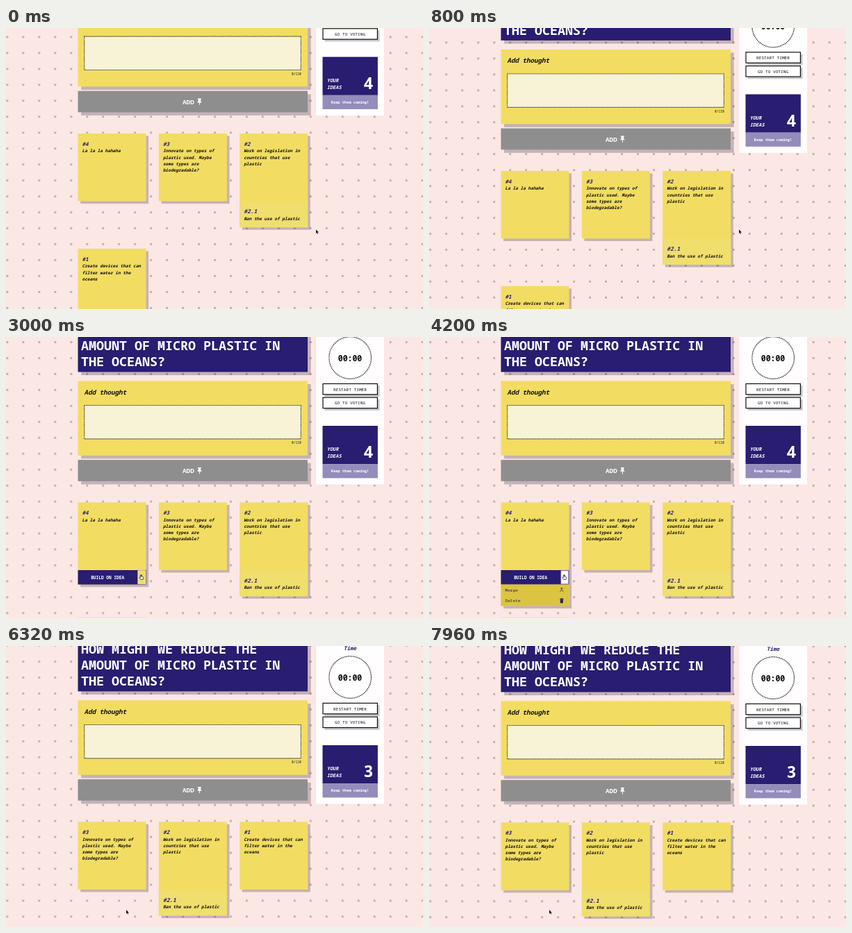
An HTML page for the animation above (8 s loop, 600 px wide and 405 px high).

```html
<!DOCTYPE html>
<html lang="en">
<head>
<meta charset="utf-8">
<title>Idea board</title>
<style>
  html, body { margin: 0; width: 100%; height: 100%; overflow: hidden; }
  svg {
    display: block; width: 600px; height: 405px;
    background: #fbe7e4 radial-gradient(circle, #b9a9ac 1.1px, #b9a9ac00 1.9px) 0 0 / 22.98px 22.98px;
  }
  text { font-family: "Noto Sans Mono", "DejaVu Sans Mono", monospace; font-weight: 500; white-space: pre; }
  .slant { font-style: italic; font-weight: 700; }
  .bold { font-weight: 700; }
</style>
</head>
<body>
<svg id="stage" viewBox="0 0 600 405"></svg>
<script>
const LOOP = 8000, OPEN_AT = 3800, DELETE_AT = 5640;
const NAVY = '#281d70', YELLOW = '#f2dd62', GOLD = '#dac442', INK = '#111', WHITE = '#fff';
const DOT_PITCH = 22.98;
const stage = document.getElementById('stage');

const CARD = { w: 98, h: 97.6, top: 238.4, xs: [103.5, 219.9, 336.2], rowGap: 166 };
const BAR_H = 20.7, ROW_H = 15.5;
const IDEAS = [
  { id: '#4', lines: ['La la la hahaha'] },
  { id: '#3', lines: ['Innovate on types of', 'plastic used. Maybe', 'some types are', 'biodegradable?'] },
  { id: '#2', lines: ['Work on legislation in', 'countries that use', 'plastic'],
    child: { id: '#2.1', line: 'Ban the use of plastic' } },
  { id: '#1', lines: ['Create devices that can', 'filter water in the', 'oceans'] },
];

// Tip of the pointer: time, x, y.
const CURSOR = [[1400, 446, 290.5], [2000, 194, 343], [4250, 194, 343], [4950, 172, 380.3], [5700, 172, 380.3], [5900, 173, 380.3]];

const clamp = v => Math.max(0, Math.min(1, v));
const smooth = v => (v = clamp(v), v * v * (3 - 2 * v));

// Vertical page shift relative to its resting place after the scroll.
function pageShift(t) {
  if (t >= DELETE_AT) return 15 + clamp((t - 7360) / 500);
  return 86.5 / (1 + Math.exp((742 - t) / 116)) - 86.5;
}

function cursorAt(t) {
  let i = 0;
  while (i < CURSOR.length - 2 && t > CURSOR[i + 1][0]) i++;
  const [t0, x0, y0] = CURSOR[i], [t1, x1, y1] = CURSOR[i + 1];
  const k = smooth((t - t0) / (t1 - t0));
  return { x: x0 + (x1 - x0) * k, y: y0 + (y1 - y0) * k };
}

const rect = (x, y, w, h, fill, extra = '') =>
  `<rect x="${x}" y="${y}" width="${w}" height="${h}" fill="${fill}" ${extra}/>`;
const shadow = (x, y, w, h, d) => rect(x + d, y + d, w, h, '#2d1c38', 'opacity=".26"');
const panel = (x, y, w, h, fill, d = 4.6) => shadow(x, y, w, h, d) + rect(x, y, w, h, fill);
const text = (x, y, size, fill, str, cls = '', anchor = 'start') =>
  `<text x="${x}" y="${y}" font-size="${size}" fill="${fill}" class="${cls}" text-anchor="${anchor}">${str}</text>`;
const path = (d, fill, extra = '') => `<path d="${d}" fill="${fill}" ${extra}/>`;
const at = (x, y, content) => `<g transform="translate(${x} ${y})">${content}</g>`;

function header() {
  const title = ['HOW MIGHT WE REDUCE THE', 'AMOUNT OF MICRO PLASTIC IN', 'THE OCEANS?'];
  return panel(103.5, -60, 330.5, 110.4, NAVY) +
    title.map((line, i) => text(108, -3.6 + i * 22.8, 18.35, WHITE, line, 'bold')).join('');
}

function form() {
  const pin = path('M-2.6-4.5h5.2v1.2h-.8v2.7l1.6 2H.5V4.8h-1V1.4h-2.9l1.6-2v-2.7h-.8z', WHITE);
  return panel(103.5, 63.4, 330.5, 107.4, YELLOW) +
    text(112.5, 82.6, 9.2, INK, 'Add thought', 'slant') +
    rect(112.7, 98.5, 311.6, 48.4, '#f8f3d7', `stroke="${INK}" stroke-width="1.1" stroke-dasharray="1.2 1.1"`) +
    text(424.7, 154.2, 4.55, INK, '0/110', '', 'end') +
    panel(103.5, 177.1, 330.5, 30.7, '#8e8e8e') +
    text(254, 196, 9.3, WHITE, 'ADD', 'bold') + at(278.4, 192.4, pin);
}

function sidebar(count) {
  const button = (y, label) => shadow(455.5, y, 79, 16, 3) +
    rect(456, y + .4, 78.4, 15.4, WHITE, `stroke="${INK}" stroke-width="1.2"`) +
    text(495, y + 10.5, 6.15, INK, label, '', 'middle');
  return rect(446, -100, 98, 312.5, '#fffdfd') +
    text(495, -9.3, 7.7, NAVY, 'Time', 'slant', 'middle') +
    `<circle cx="495.2" cy="30" r="30.3" fill="${WHITE}" stroke="${INK}" stroke-width="1.3" stroke-dasharray="1.3 1.1"/>` +
    text(495, 34.6, 11.5, INK, '00:00', 'bold', 'middle') +
    button(67, 'RESTART TIMER') + button(86.8, 'GO TO VOTING') +
    rect(455.5, 128, 79.4, 55.2, NAVY) + rect(455.5, 183.2, 79.4, 20.2, '#948cba') +
    text(461.8, 164, 6.95, WHITE, 'YOUR', 'slant') + text(461.8, 174.3, 6.95, WHITE, 'IDEAS', 'slant') +
    text(528.7, 174.2, 24, WHITE, count, 'bold', 'end') +
    text(495, 195.4, 5.35, WHITE, 'Keep them coming!', 'bold', 'middle');
}

function actionBar(x, y, open, pointer) {
  const overButton = pointer.x > x + 86 && pointer.y > y && pointer.y < y + BAR_H;
  const dotColor = open || overButton ? NAVY : WHITE;
  const fill = open ? WHITE : overButton ? YELLOW : NAVY;
  let out = rect(x, y, CARD.w, BAR_H, NAVY) +
    text(x + 18.7, y + 12.7, 6.15, WHITE, 'BUILD ON IDEA', 'bold') +
    rect(x + 86.4, y + .8, 10.8, BAR_H - 1.6, fill, `stroke="${open ? '#8f88c4' : WHITE}" stroke-width=".7"`) +
    [-2.7, 0, 2.7].map(d => `<circle cx="${x + 91.8}" cy="${y + 10.3 + d}" r=".85" fill="${dotColor}"/>`).join('');
  if (!open) return out;
  const icons = {
    Merge: c => path('M0-3V-.3L-2.5 2.7M0-.3L2.5 2.7M-1.5-1.7L0-3.2 1.5-1.7', 'none', `stroke="${c}" stroke-width=".8"`),
    Delete: c => path('M-2.6-3h1.5l.4-.6H.7l.4.6h1.5v.9h-5.2zM-2.2-1.7h4.4L1.9 3.4h-3.8z', c),
  };
  Object.keys(icons).forEach((label, i) => {
    const top = y + BAR_H + i * ROW_H;
    const over = pointer.y > top && pointer.y < top + ROW_H;
    const color = over ? WHITE : NAVY;
    out += rect(x, top, CARD.w, ROW_H, over ? NAVY : GOLD) +
      text(x + 6, top + 10, 6.15, color, label, over ? 'bold' : '') +
      at(x + 87.4, top + 7.8, icons[label](color));
  });
  return out;
}

function ideaCard(idea, slot, menuOpen, pointer) {
  const x = CARD.xs[slot % 3], y = CARD.top + Math.floor(slot / 3) * CARD.rowGap;
  const height = CARD.h + (idea.child ? 37.6 : 0);
  const open = menuOpen && idea.id === '#4';
  const barHeight = BAR_H + (open ? 2 * ROW_H : 0);
  const hover = pointer.x > x && pointer.x < x + CARD.w && pointer.y > y && pointer.y < y + height + barHeight;
  let out = panel(x, y, CARD.w, height + (hover ? barHeight : 0), YELLOW, 3.6) +
    text(x + 6, y + 18, 7.7, NAVY, idea.id, 'slant') +
    idea.lines.map((line, i) => text(x + 6, y + 27.4 + i * 9.2, 6.13, INK, line, 'slant')).join('');
  if (idea.child) {
    const top = y + CARD.h;
    out += rect(x, top, CARD.w, 37.6, '#f0de6d') +
      text(x + 6, top + 17.6, 7.9, NAVY, idea.child.id, 'slant') +
      text(x + 6, top + 27.2, 6.13, INK, idea.child.line, 'slant');
  }
  return out + (hover ? actionBar(x, y + height, open, pointer) : '');
}

function cursor({ x, y }, hand) {
  if (hand) {
    const shape = 'M-.7 0Q0-.6.6 0V2.2l2.7.6Q4 3.2 3.8 4L3.2 6.4H-.2L-2.2 3.9Q-2.2 2.9-.7 3.9z';
    return at(x, y, path(shape, WHITE, `stroke="${INK}" stroke-width=".7"`));
  }
  const arrow = 'M0 0V5.6L1.3 4.4 2.2 6.5 3.1 6.1 2.2 4.1H4z';
  return at(x, y, path(arrow, INK, `stroke="${WHITE}" stroke-width=".7" paint-order="stroke"`));
}

function draw(now) {
  const t = now % LOOP, shift = pageShift(t), tip = cursorAt(t);
  const pointer = { x: tip.x, y: tip.y - shift };
  const deleted = t >= DELETE_AT;
  const ideas = deleted ? IDEAS.slice(1) : IDEAS;
  const menuOpen = t >= OPEN_AT && !deleted;
  const hand = !deleted && t > 1900;
  stage.style.backgroundPosition = `${1.9 - DOT_PITCH / 2}px ${375 - DOT_PITCH / 2 + shift}px`;
  stage.innerHTML = at(0, shift, header() + form() + sidebar(ideas.length) +
    ideas.map((idea, slot) => ideaCard(idea, slot, menuOpen, pointer)).join('')) + cursor(tip, hand);
}

const start = performance.now();
function tick() {
  draw(performance.now() - start);
  requestAnimationFrame(tick);
}
tick();
</script>
</body>
</html>
```
